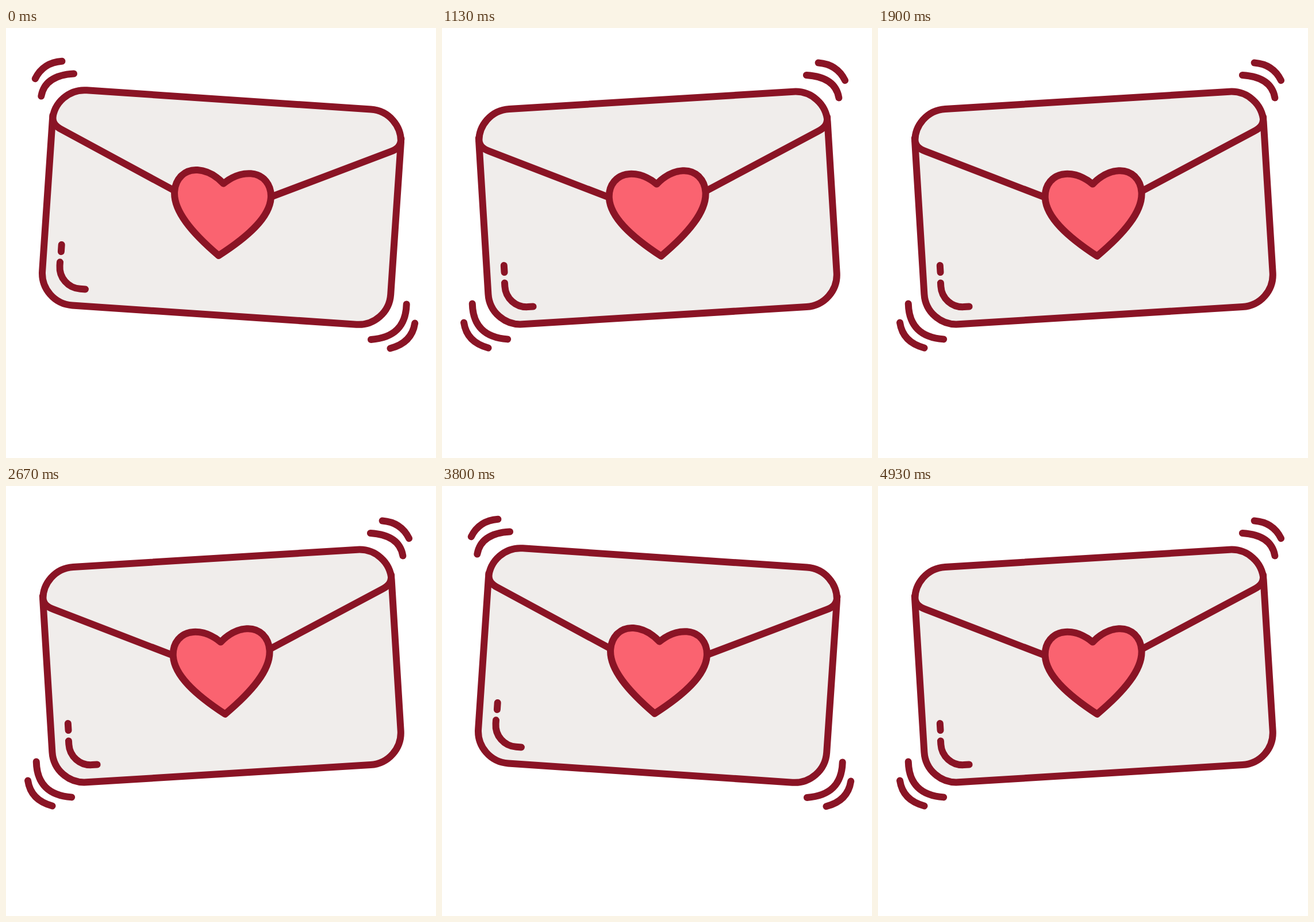
Recreate the animation shown at these times as an HTML page. Size 748 px wide and 748 px high, loop 5.31 s.

```html
<!DOCTYPE html>
<html lang="en">
<head>
<meta charset="utf-8">
<title>Wiggling love letter</title>
<style>
  html, body { margin: 0; width: 100%; height: 100%; overflow: hidden; background: #fff; }
  svg { display: block; width: 100%; height: 100%; }
  .ink { fill: none; stroke: #8a1425; stroke-width: 12; stroke-linecap: round; stroke-linejoin: round; }
  .paper { fill: #f0edeb; }
  .heart { fill: #fa6370; }
</style>
</head>
<body>
<svg viewBox="0 0 748 748">
  <g id="letter" class="ink">
    <rect class="paper" x="-303.7" y="-187.5" width="607.4" height="375" rx="56"/>
    <path d="M-303.7 -140C-303.7 -126 -297 -121 -286 -116L0 14.7L286 -116C297 -121 303.7 -126 303.7 -140"/>
    <path class="heart" d="M.5 -41.5C-14 -55 -30 -62 -46 -62C-68 -62 -83.5 -45 -83.5 -22C-83.5 12 -48 48 .5 84C49 48 84.5 12 84.5 -22C84.5 -45 69 -62 47 -62C31 -62 15 -55 .5 -41.5Z"/>
    <path d="M-273.3 83.5V95.5M-274 114V120A38 38 0 0 0 -236 158H-227"/>
    <!-- Shake marks, mirrored with the tilt -->
    <g id="marks">
      <path d="M-338.5 -201.5Q-326.5 -230.5 -294 -235"/>
      <path d="M-326 -172Q-322 -208.5 -272 -214.7"/>
      <path d="M332.3 146.5Q334.5 204 274.8 212"/>
      <path d="M349 178.5Q346 213 309.3 225"/>
    </g>
  </g>
</svg>
<script>
  const LOOP = 5310;
  const FLIPS = [370, 770, 1130, 1530, 1900, 2300, 2670, 3070, 3400, 3800, 4170, 4570, 4930];
  const POSES = [
    { letter: 'translate(375 312) rotate(3.85)', marks: 'scale(1 1)' },
    { letter: 'translate(375.5 313) rotate(-3.5)', marks: 'scale(-1 1)' }
  ];
  const letter = document.getElementById('letter');
  const marks = document.getElementById('marks');
  const start = performance.now();

  function draw(now) {
    const t = Math.max(0, now - start) % LOOP;
    const pose = POSES[FLIPS.filter(flip => flip <= t).length % 2];
    letter.setAttribute('transform', pose.letter);
    marks.setAttribute('transform', pose.marks);
    requestAnimationFrame(draw);
  }
  draw(start);
</script>
</body>
</html>
```
